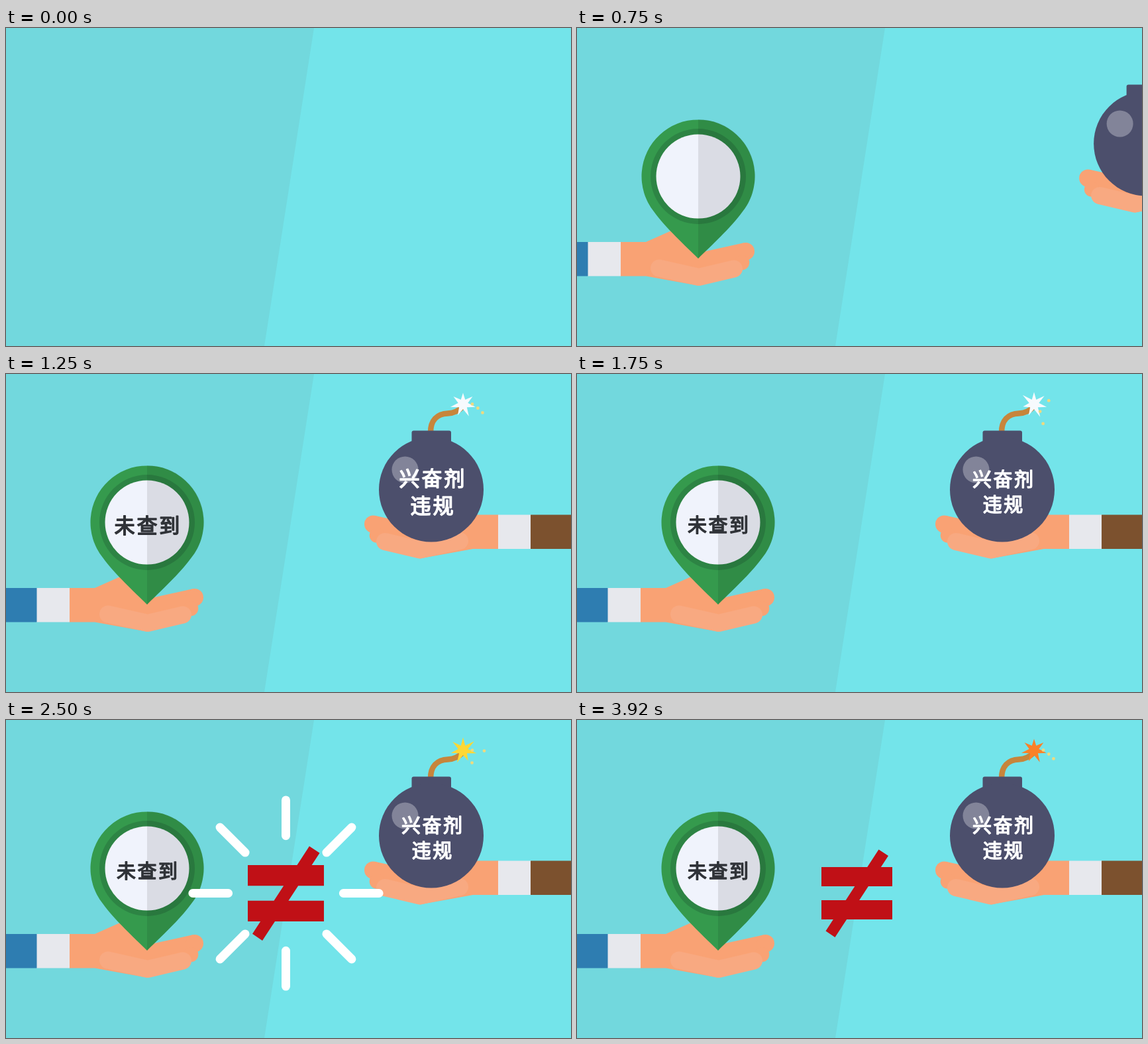
These frames come from a looping animation (853 px wide and 480 px high, 4.01 s). An HTML page:

```html
<!DOCTYPE html>
<html lang="zh-CN">
<head>
<meta charset="utf-8">
<style>
html, body { margin: 0; width: 100%; height: 100%; overflow: hidden; background: #73e4ea; }
svg { display: block; width: 100vw; height: 100vh; }
text { font: 400 29px "Noto Sans CJK SC", "Noto Sans CJK", sans-serif; letter-spacing: 2.6px;
  text-anchor: middle; stroke-width: 1.5; stroke-linejoin: round; }
</style>
</head>
<body>
<svg viewBox="0 0 853 480" preserveAspectRatio="none">
  <defs>
    <g id="arm">
      <g fill="#f9a274">
        <path d="M95 323H134L170 307Q178 302 190 325L222 337.500L282 324.300L285 350L214 389L134 374.500H95Z"/>
        <circle cx="284.800" cy="337.200" r="13.200"/>
        <circle cx="279" cy="354" r="11.300"/>
      </g>
      <path fill="none" stroke="#f8a981" stroke-width="26" stroke-linecap="round" stroke-linejoin="round"
        d="M154 362.500L214 376L267 363.500"/>
      <rect x="46" y="323" width="50" height="51.500" fill="#e7e8ed"/>
    </g>
  </defs>
  <rect width="853" height="480" fill="#73e4ea"/>
  <path fill="#72d8dd" d="M0 0H465L390 480H0Z"/>

  <g id="left">
    <use href="#arm"/>
    <rect x="-300" y="323" width="346.500" height="51.500" fill="#2e7db1"/>
    <path fill="#359a4d" d="M213 348C194 329 164 302 146 277A85.500 85.500 0 1 1 280 277C262 302 232 329 213 348Z"/>
    <circle cx="213" cy="224" r="72" fill="#2d8444"/>
    <circle cx="213" cy="224" r="63.500" fill="#f0f3fc"/>
    <path fill="#000" fill-opacity=".095" d="M213 348V138A85.500 85.500 0 0 1 280 277C262 302 232 329 213 348Z"/>
    <g id="leftText" fill="#303338" stroke="#303338">
      <text x="214.300" y="239">未查到</text>
    </g>
  </g>

  <g id="right">
    <use href="#arm" transform="matrix(-1 0 0 1 839 -110.500)"/>
    <rect x="792" y="212.500" width="400" height="51.500" fill="#7c512e"/>
    <path fill="none" stroke="#c7853b" stroke-width="8.500" d="M641 88C641 70 651 60 667 59.500C677 59 683 56 690 49"/>
    <rect x="612.500" y="85.500" width="59.500" height="24" rx="3" fill="#4c4f6c"/>
    <circle cx="642" cy="174.500" r="79" fill="#4c4f6c"/>
    <circle cx="602.500" cy="144.500" r="20" fill="#fff" fill-opacity=".3"/>
    <polygon id="star"/>
    <g id="dots"></g>
    <g id="rightText" fill="#fff" stroke="#fff">
      <text x="644.300" y="170">兴奋剂</text>
      <text x="644.300" y="208">违规</text>
    </g>
  </g>

  <path id="sign" fill="#c01016" d="M369 222H476V251H369ZM369 272H476V301H369ZM455.500 195.500L470 205L389.500 328L375.500 318.500Z"/>
  <path id="rays" fill="none" stroke="#fff" stroke-width="13" stroke-linecap="round"/>
</svg>
<script>
const LOOP = 4010, STEP = 250 / 3;
const $ = id => document.getElementById(id);
const progress = (n, from, len) => Math.max(0, Math.min(1, (n - from) / len));

// The picture advances twelve times a second, on times rounded to 10 ms
const startOf = n => Math.round(50 + n * STEP / 10) * 10;
function stepAt(t) {
  const n = Math.floor((t - 496) / STEP);
  return startOf(n) > t ? n - 1 : n;
}

const easeOut = (p, power) => 1 - (1 - p) ** power;

function backOut(p, over = 1.44) {
  const q = p - 1;
  return 1 + (over + 1) * q ** 3 + over * q ** 2;
}

function random(seed) {
  const v = Math.sin(seed * 12.9898 + 4.1) * 43758.5453;
  return v - Math.floor(v);
}

function polar(x, y, r, angle) {
  return `${(x + r * Math.cos(angle)).toFixed(2)} ${(y + r * Math.sin(angle)).toFixed(2)}`;
}

function slide(id, dx) {
  $(id).setAttribute("transform", `translate(${dx} 0)`);
}

function pop(id, p, x, y) {
  $(id).setAttribute("display", p > 0 ? "inline" : "none");
  $(id).setAttribute("transform", `translate(${x} ${y}) scale(${backOut(p)}) translate(${-x} ${-y})`);
}

function drawSpark(n) {
  const seed = n % 4 * 20, spikes = 7, points = [];
  for (let i = 0; i < spikes * 2; i++) {
    const r = i % 2 ? 7.5 : 17 + 6 * random(seed + i);
    points.push(polar(690, 45.5, r, (i / spikes - .5) * Math.PI));
  }
  $("star").setAttribute("points", points.join(" "));
  $("star").setAttribute("fill", n % 2 === 0 ? "#fdd835" : n % 3 ? "#fa8128" : "#f7fafd");

  let dots = "";
  for (let i = 0; i < 3; i++) {
    const [x, y] = polar(690, 46, 14 + 9 * i, 1.6 * random(seed + 15 + i) - .4).split(" ");
    dots += `<circle cx="${x}" cy="${y}" r="2.4" fill="#eeda80"/>`;
  }
  $("dots").innerHTML = dots;
}

// Eight strokes fly outwards, their tails catching up with the heads
function drawRays(n) {
  let d = "";
  if (n >= 18 && n <= 26) {
    const head = 165 * easeOut(progress(n, 16, 13), 2);
    const tail = Math.min(head, 28 + 128 * progress(n, 18, 8) ** 2.7);
    for (let i = 0; i < 8; i++) {
      const a = i * Math.PI / 4;
      d += `M${polar(422.5, 261.5, tail, a)}L${polar(422.5, 261.5, head, a)}`;
    }
  }
  $("rays").setAttribute("d", d);
}

function draw(t) {
  const n = stepAt(t), on = n >= 0;
  for (const id of ["left", "right"]) $(id).setAttribute("display", on ? "inline" : "none");
  slide("left", 298 * (easeOut(progress(n, -.53, 6.6), 3) - 1));
  slide("right", 312 * (1 - easeOut(progress(n, 2.3, 6.15), 3)));
  pop("leftText", progress(n, 3, 9.8), 213, 228);
  pop("rightText", progress(n, 3, 9.8), 643, 178);
  pop("sign", progress(n, 18, 9.8), 422.5, 261.5);
  drawRays(n);
  if (on) drawSpark(n);
}

const begin = performance.now();
function tick() {
  draw((performance.now() - begin) % LOOP);
  requestAnimationFrame(tick);
}
tick();
</script>
</body>
</html>
```
